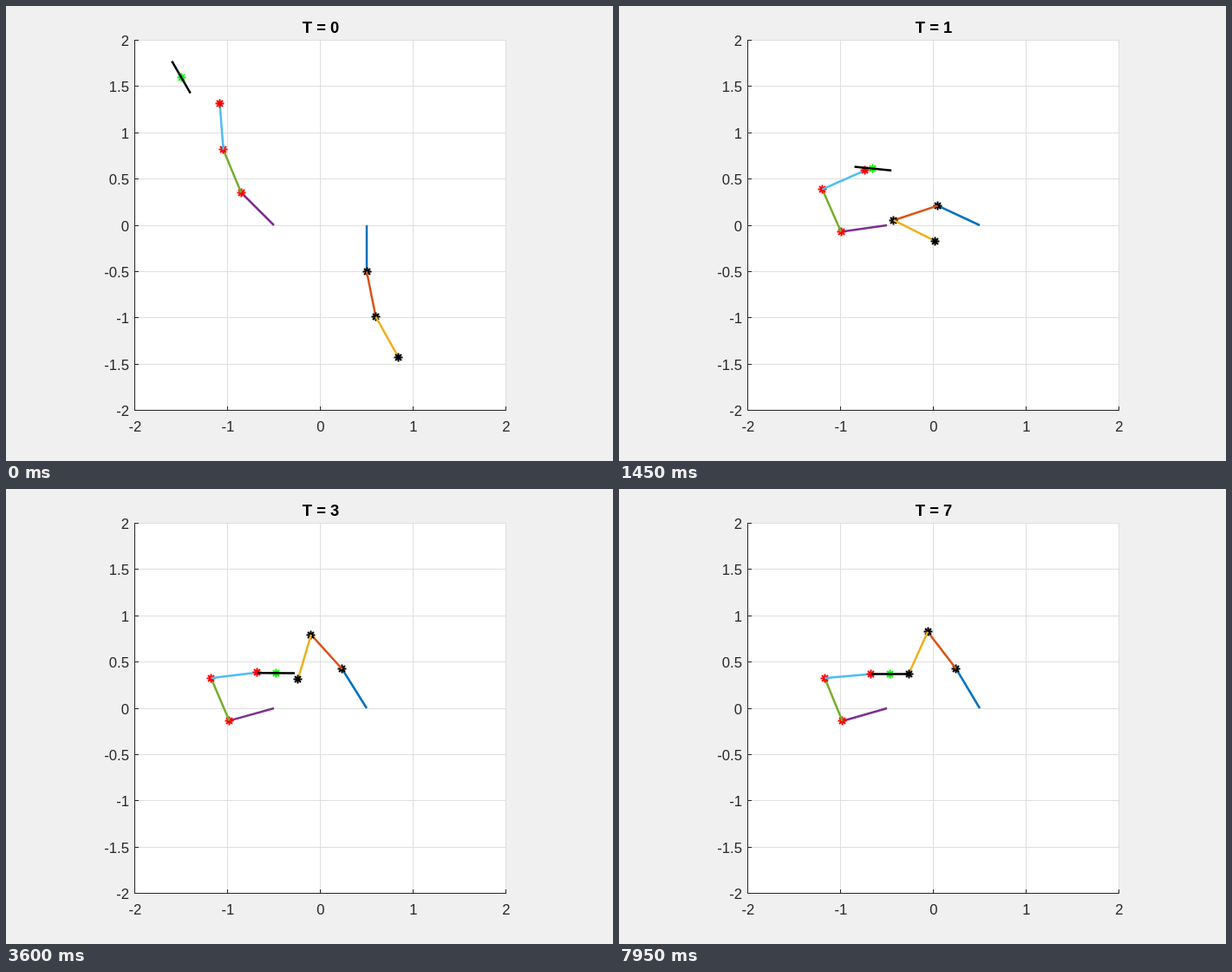
These frames come from a looping animation (700x525 px, 8000 ms). An HTML page:

```html
<!DOCTYPE html>
<html lang="en">
<head>
<meta charset="utf-8">
<title>Two arms catching a bar</title>
<style>
  html, body { margin: 0; width: 100%; height: 100%; overflow: hidden; background: #f0f0f0; }
  svg { display: block; width: 700px; height: 525px; }
  text { font: 16.67px "Liberation Sans", Arial, sans-serif; fill: #262626; }
  #title { font-size: 18.33px; font-weight: bold; fill: #000; }
  .grid { stroke: #dfdfdf; }
  .axis { stroke: #262626; }
</style>
</head>
<body>
<svg id="stage" viewBox="0 0 700 525">
  <rect x="148" y="39" width="429" height="428" fill="#fff"/>
</svg>
<script>
const LOOP = 8000, STEP = 50, LINK = 0.5, HALF_BAR = 0.2;
const stage = document.getElementById('stage');
const px = x => 362.5 + 107 * x;
const py = y => 253 - 106.75 * y;
const snap = v => Math.floor(v) + 0.5;

function add(tag, attrs, text = '') {
  const el = document.createElementNS('http://www.w3.org/2000/svg', tag);
  for (const name in attrs) el.setAttribute(name, attrs[name]);
  el.textContent = text;
  return stage.appendChild(el);
}
const path = (cls, d) => add('path', { class: cls, d, fill: 'none' });

// Axes
const LEFT = 148.5, BOTTOM = 466.5;
const xTicks = [-2, -1, 0, 1, 2];
const yTicks = [-2, -1.5, -1, -0.5, 0, 0.5, 1, 1.5, 2];
const rowY = y => y === -2 ? BOTTOM : snap(py(y));
xTicks.forEach(x => path('grid', `M${px(x)} 39V467`));
yTicks.forEach(y => path('grid', `M148 ${rowY(y)}H577`));
path('axis', `M${LEFT} 39V${BOTTOM}H577`);
xTicks.forEach(x => {
  path('axis', `M${px(x)} ${BOTTOM}v-4.5`);
  add('text', { x: px(x) + 0.3, y: 491, 'text-anchor': 'middle' }, x);
});
yTicks.forEach(y => {
  path('axis', `M${LEFT} ${rowY(y)}h4.5`);
  add('text', { x: 142, y: rowY(y) + 6.3, 'text-anchor': 'end' }, y);
});
const title = add('text', { id: 'title', x: 363, y: 31, 'text-anchor': 'middle' });

// Moving parts
const makeLine = stroke => add('line', { stroke, 'stroke-width': 2.5 });
const makeStar = stroke => add('path', {
  stroke, 'stroke-width': 2, d: 'M-5 0H5M0-5V5M-3.5-3.5L3.5 3.5M-3.5 3.5L3.5-3.5'
});
const makeArm = (base, starColor, colors) => ({
  base, links: colors.map(c => ({ line: makeLine(c), star: makeStar(starColor) }))
});
const blackArm = makeArm(0.5, '#000', ['#0072bd', '#d95319', '#edb120']);
const redArm = makeArm(-0.5, '#f00', ['#7e2f8e', '#77ac30', '#4dbeee']);
const barStar = makeStar('#0f0');
const bar = makeLine('#000');

function setLine(el, x1, y1, x2, y2) {
  el.setAttribute('x1', px(x1));
  el.setAttribute('y1', py(y1));
  el.setAttribute('x2', px(x2));
  el.setAttribute('y2', py(y2));
}
const setStar = (el, x, y) =>
  el.setAttribute('transform', `translate(${snap(px(x))} ${snap(py(y))})`);

function poseArm({ base, links }, angles) {
  let x = base, y = 0;
  links.forEach(({ line, star }, i) => {
    const a = angles[i] * Math.PI / 180;
    const nx = x + LINK * Math.cos(a), ny = y + LINK * Math.sin(a);
    setLine(line, x, y, nx, ny);
    setStar(star, nx, ny);
    x = nx;
    y = ny;
  });
}

// Smooth curve through key values, taken over e^-t since all parts settle exponentially
const keys = [0, 0.45, 0.85, 1.45, 2.25, 3.6, 5.9, 8].map(t => Math.exp(-t));
function curve(values) {
  const last = keys.length - 1;
  const secant = i => (values[i + 1] - values[i]) / (keys[i + 1] - keys[i]);
  const slopes = keys.map((k, i) => {
    if (i === 0) return 1.5 * secant(0) - 0.5 * secant(1);
    if (i === last) return secant(last - 1);
    const before = k - keys[i - 1], after = keys[i + 1] - k;
    return (secant(i - 1) * after + secant(i) * before) / (before + after);
  });
  return t => {
    const s = Math.exp(-t);
    let i = 0;
    while (i < last - 1 && s < keys[i + 1]) i++;
    const h = keys[i + 1] - keys[i], u = (s - keys[i]) / h, v = 1 - u;
    return v * v * ((1 + 2 * u) * values[i] + u * h * slopes[i])
         + u * u * ((1 + 2 * v) * values[i + 1] - v * h * slopes[i + 1]);
  };
}
const blackAngles = [
  [-90, -126.7, -165, -205.1, -229.7, -238, -239.1, -239.2],
  [-78.75, -89.5, -120, -161.6, -211.3, -228, -231.9, -232.5],
  [-60.75, -24.2, -6, -26.6, -80.4, -106.4, -113.2, -114.2]
].map(curve);

const decay = (rate, t) => Math.exp(-rate * t);
function redAngles(t) {
  const w = t / 1.8;
  return [
    196 - 61 * decay(1.4, t),
    112.2 + 0.3 * decay(1, t) + 1.6 * w * w * Math.exp(2 - 2 * w),
    5.2 + 89.3 * decay(1.07, t)
  ];
}

function draw(ms) {
  const t = ms / 1000;
  title.textContent = `T = ${Math.floor(t)}`;
  poseArm(blackArm, blackAngles.map(f => f(t)));
  poseArm(redArm, redAngles(t));

  const x = -0.467 - 1.033 * (1.59 * decay(1.5, t) - 0.59 * decay(3.75, t));
  const y = 0.371 + 1.229 * (1.8 * decay(1.5, t) - 0.8 * decay(3.15, t));
  const tilt = -Math.PI / 3 * decay(1.65, t);
  const dx = HALF_BAR * Math.cos(tilt), dy = HALF_BAR * Math.sin(tilt);
  setStar(barStar, x, y);
  setLine(bar, x - dx, y - dy, x + dx, y + dy);
}

const start = performance.now();
function tick() {
  const ms = (performance.now() - start) % LOOP;
  draw(Math.floor(ms / STEP) * STEP);
  requestAnimationFrame(tick);
}
tick();
</script>
</body>
</html>
```
